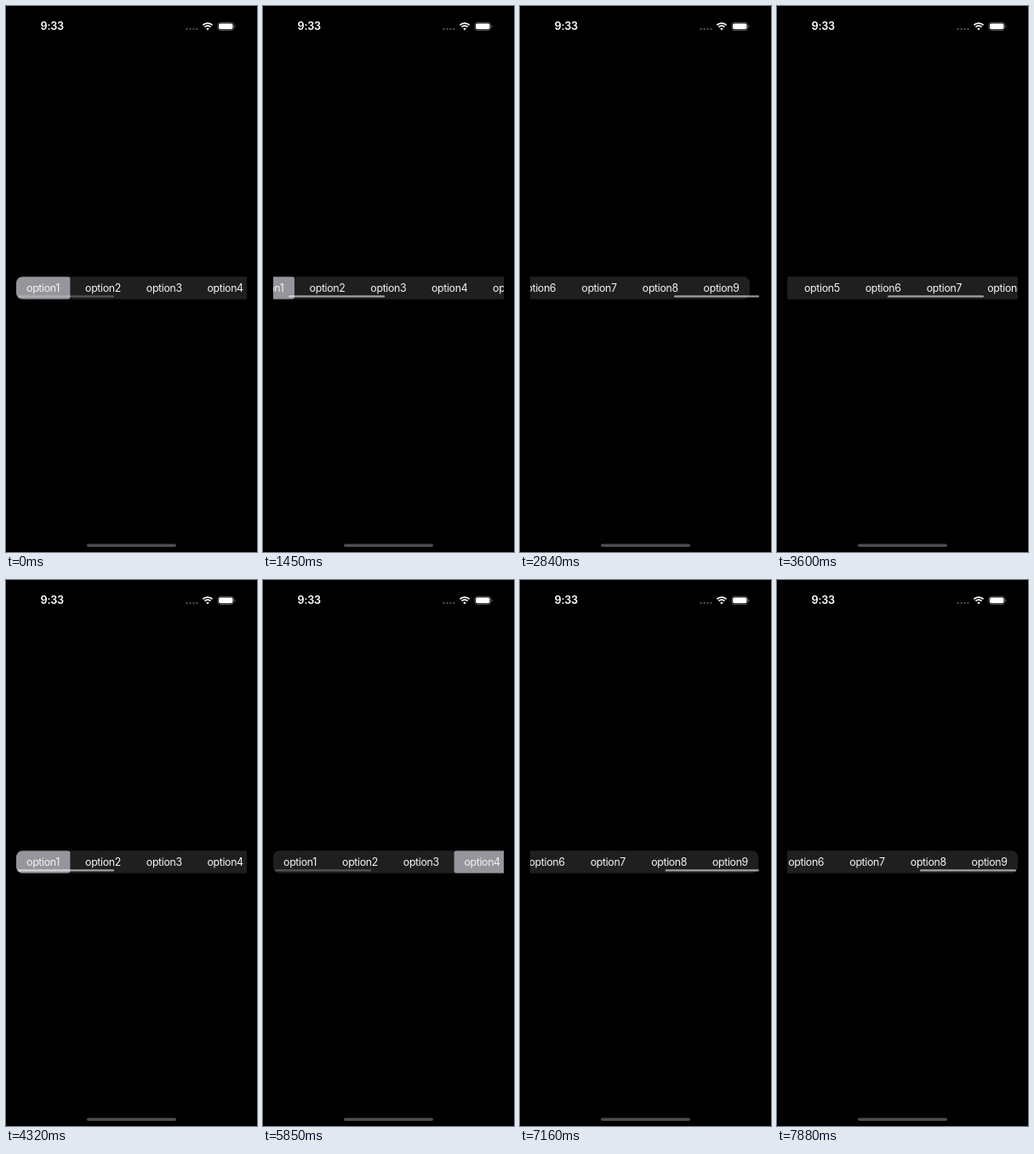
Write an HTML page that moves like this. It is 295 px wide and 640 px high and loops after 8000 ms.

```html
<!DOCTYPE html>
<html lang="en">
<head>
<meta charset="utf-8">
<title>Scrolling segmented control</title>
<style>
  html, body { margin: 0; width: 100%; height: 100%; overflow: hidden; background: #000; }
  svg { display: block; width: 295px; height: 640px; }
  text { font-family: Inter, Roboto, sans-serif; fill: #fff; }
  .label { font-size: 12.4px; letter-spacing: -.36px; text-anchor: middle; fill: #f4f4f4; }
  .clock { font-size: 12.7px; font-weight: 600; letter-spacing: -.25px; }
</style>
</head>
<body>
<svg viewBox="0 0 295 640">
  <defs>
    <clipPath id="view"><rect x="12" y="310" width="271" height="40"/></clipPath>
    <clipPath id="round"><rect x="12" y="317.2" width="638" height="26.5" rx="7.5"/></clipPath>
  </defs>
  <rect width="295" height="640"/>

  <text class="clock" x="40.6" y="28.3">9:33</text>
  <path d="M212.6 27h12" stroke="#4c4c4c" stroke-width="2.4" stroke-linecap="round" stroke-dasharray="0 3.95"/>
  <g fill="none" stroke="#fff" stroke-width="1.8">
    <path d="M231.4 22.4A8 8 0 0 1 242.6 22.4"/>
    <path d="M233.5 24.7A5 5 0 0 1 240.5 24.7"/>
    <path d="M237 28.4L235.2 26.5A2.6 2.6 0 0 1 238.8 26.5Z" fill="#fff" stroke="none"/>
  </g>
  <rect x="248.9" y="19.3" width="18.8" height="9.2" rx="2.9" fill="none" stroke="#666" stroke-width=".8"/>
  <rect x="250.1" y="20.5" width="16.4" height="6.8" rx="1.8" fill="#fff"/>
  <path d="M268.7 22.4A1.7 1.7 0 0 1 268.7 25.4Z" fill="#777"/>

  <g clip-path="url(#view)">
    <g id="strip">
      <g clip-path="url(#round)">
        <rect x="12" y="317" width="638" height="27" fill="#1f1f20"/>
        <rect id="pick" y="317.2" height="26.5" rx="3" fill="#96959b"/>
      </g>
    </g>
  </g>
  <rect id="bar" y="339.2" height="2.4" rx="1.2" fill="#fff"/>
  <rect x="95" y="630.4" width="105" height="3.6" rx="1.8" fill="#4d4d4d"/>
</svg>
<script>
  const LOOP = 8000, STEP = 109;
  const VIEW = 271, CONTENT = 638, MAX = CONTENT - VIEW;
  const TRACK = 267, BAR = 113, GLOW = .58;
  const $ = id => document.getElementById(id);
  const strip = $('strip'), pick = $('pick'), bar = $('bar');

  // The first segment is narrower, as its digit is
  const width = k => 63.4 + 3 * Math.min(1, k - 1);
  const left = k => 12 + 71.8 * (k - 1) - 2.8 * Math.min(1, k - 1);

  for (let k = 1; k <= 9; k++) {
    const label = document.createElementNS('http://www.w3.org/2000/svg', 'text');
    label.setAttribute('class', 'label');
    label.setAttribute('x', left(k) + width(k) / 2 - .2);
    label.setAttribute('y', 335.1);
    label.textContent = 'option' + k;
    strip.append(label);
  }

  const move = (at, to, steps) => ({ at, to, steps });
  const scroll = [
    move(1340, 333.6, 10),
    move(2500, MAX + 13, 4),
    move(2940, MAX, 2),
    move(3280, 0, 10),
    move(6440, MAX + 4, 7.5),
    move(7150, MAX, 4)
  ];
  const choice = [move(4860, 4, 8), move(5950, 2, 5)];
  const glow = [move(0, 0, 2), move(1340, GLOW, 2), move(5850, 0, 2), move(6440, GLOW, 2)];

  // Quick start, long slow end
  const fling = p => 1 - (1 - p * p) ** 3;

  // Runs through the moves; each advances in held steps
  function valueAt(t, value, moves) {
    for (const { at, to, steps } of moves) {
      if (t < at) break;
      const done = Math.floor((t - at) / STEP) + 1;
      value += (to - value) * fling(Math.min(1, done / steps));
    }
    return value;
  }

  function draw(t) {
    const s = valueAt(t, 0, scroll), k = valueAt(t, 1, choice);
    strip.setAttribute('transform', `translate(${-s} 0)`);
    pick.setAttribute('x', left(k));
    pick.setAttribute('width', width(k));

    // The indicator shrinks while the strip is pulled past its end
    const over = Math.max(0, s - MAX);
    bar.setAttribute('x', 14 + (TRACK - BAR) * Math.min(1, s / MAX) + over);
    bar.setAttribute('width', BAR - over);
    bar.setAttribute('opacity', valueAt(t, GLOW, glow));
  }

  const start = performance.now();
  function frame() {
    draw((performance.now() - start) % LOOP);
    requestAnimationFrame(frame);
  }
  frame();
</script>
</body>
</html>
```
